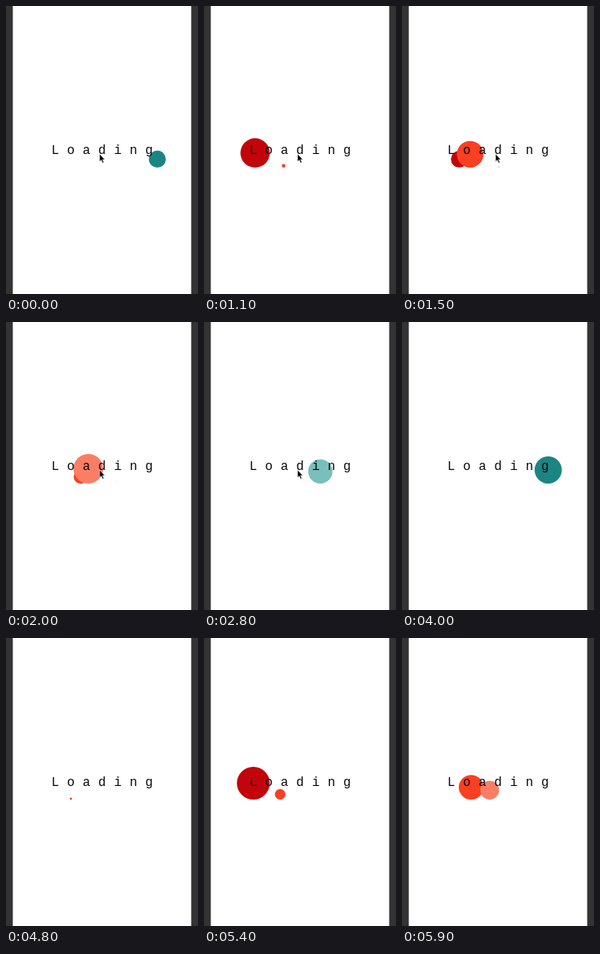
Animation of 240x360 px, one loop 6000 ms. Source, as an HTML page:

```html
<!DOCTYPE html>
<html lang="en">
<head>
<meta charset="utf-8">
<title>Loading</title>
<style>
  html, body { margin: 0; width: 100%; height: 100%; overflow: hidden; background: #fff; }
  svg { display: block; width: 100vw; height: 100vh; }
  text { font: 16px "Liberation Mono", monospace; letter-spacing: 9.95px; fill: #0b0b0b; }
</style>
</head>
<body>
<svg viewBox="0 0 240 360">
  <rect width="240" height="360" fill="#fff"/>
  <path d="M0 0H8.5V360H0zM231.5 0H240V360H231.5z" fill="#333"/>
  <g id="dots"></g>
  <text x="56.7" y="185.4">Loading</text>
  <path id="cursor" d="M0 0V9.4L2.1 7.5L3.7 11.2L5.3 10.5L3.7 6.9H6.5z" fill="#000" stroke="#fff" stroke-width=".5"/>
</svg>
<script>
const LOOP = 6000, CYCLE = 4180, START = 590, STAGGER = 447, HALF = 602;
const LEFT = 82.2, PITCH = 19.6, RADIUS = 21.6, FLOOR = 202;
const colors = ["#c1050b", "#fa3f22", "#fc7d66", "#fcfcfb", "#79bfbc", "#43a4a1", "#1b8584"];
const cursor = document.getElementById("cursor");

const dots = colors.map(fill => {
  const dot = document.createElementNS("http://www.w3.org/2000/svg", "circle");
  dot.setAttribute("fill", fill);
  return document.getElementById("dots").appendChild(dot);
});

// Each dot grows and shrinks linearly, pinned at its lower right corner.
function drawDot(dot, i, time) {
  const age = (time - START - i * STAGGER + CYCLE) % CYCLE;
  const r = RADIUS * Math.max(0, 1 - Math.abs(age / HALF - 1));
  dot.setAttribute("r", r);
  dot.setAttribute("cx", LEFT + i * PITCH - r);
  dot.setAttribute("cy", FLOOR - r);
}

function drawCursor(t) {
  const move = Math.min(1, Math.max(0, (t - 3100) / 300));
  cursor.setAttribute("transform", `translate(${117 - 32 * move} ${185 - 56 * move})`);
  cursor.style.display = t < 3500 ? "" : "none";
}

const origin = performance.now();

function frame() {
  const t = (performance.now() - origin) % LOOP;
  const time = t + Math.max(0, t - 5400) * 0.18; // slightly faster at the end
  dots.forEach((dot, i) => drawDot(dot, i, time));
  drawCursor(t);
  requestAnimationFrame(frame);
}
frame();
</script>
</body>
</html>
```
